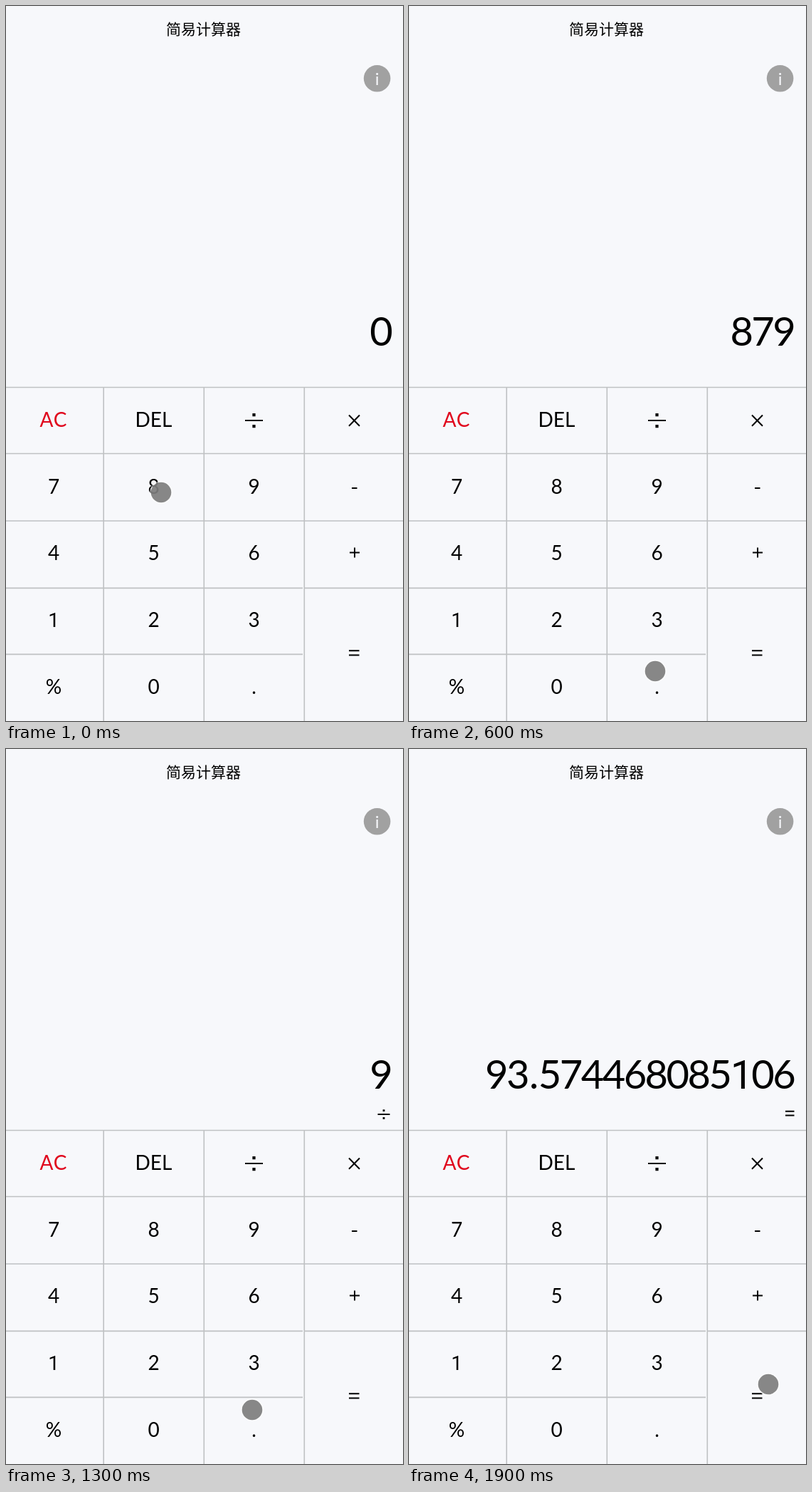
Write an HTML page that moves like this. It is 558x1004 px and loops after 2 s.

```html
<!DOCTYPE html>
<html lang="zh-CN">
<head>
<meta charset="utf-8">
<title>简易计算器</title>
<style>
  html, body { margin: 0; width: 100%; height: 100%; overflow: hidden; background: #f7f8fb; }
  svg { display: block; width: 100%; height: 100%; }
  text { font: 28px Lato, sans-serif; text-anchor: middle; }
  .one { font-family: Roboto, sans-serif; }
  .title { font: 21px "Noto Sans CJK SC", "Noto Sans CJK", sans-serif; }
  .info { font-size: 24px; fill: #f7f8fb; }
  #value, #value .one { font-size: 56px; }
  .grid { stroke: #bfc1c3; stroke-width: 1.6; fill: none; }
  .sign { stroke: #000; stroke-width: 2; fill: none; }
</style>
</head>
<body>
<svg viewBox="0 0 558 1004">
  <text class="title" x="277.5" y="40">简易计算器</text>
  <circle cx="521.6" cy="101.8" r="18.8" fill="#a1a1a1"/>
  <text class="info" x="521.6" y="111">i</text>

  <path class="grid" d="M0 535.5H558M0 628.5H558M0 723H558M0 817.4H417M419 817.4H558M0 910.4H417
    M137.2 535V1004M278.3 535V1004M419.3 535V1004"/>

  <g id="keys"></g>
  <path class="sign" stroke-width="2.4" d="M336 582H361"/>
  <path d="M346.4 572h4.2v4.2h-4.2zM346.4 588h4.2v4.2h-4.2z"/>
  <path class="sign" d="M482 574.5L497 589.7M497 574.5L482 589.7
    M486 677H493.5M483 767.5H497M490 760.5V774.5M482 905.2H496.5M482 911.4H496.5"/>

  <text id="value" y="476.5"></text>
  <g id="divide">
    <path class="sign" d="M522.5 513H539.5"/>
    <path d="M529.6 506.2h2.8v2.8h-2.8zM529.6 517h2.8v2.8h-2.8z"/>
  </g>
  <path id="equals" class="sign" d="M529 508.8H541.5M529 514.4H541.5"/>

  <g id="touch">
    <circle r="16" fill="#fff" opacity=".5"/>
    <circle r="14.3" fill="#707070" opacity=".84"/>
  </g>
</svg>
<script>
const byId = id => document.getElementById(id);
const glyph = (c, x) => `<tspan x="${x}"${c === '1' ? ' class="one"' : ''}>${c}</tspan>`;

const cols = [67, 207.5, 348.5];
const rows = [[591, ['AC', 'DEL']], [685, '789'], [778, '456'], [872, '123'], [966, '%0.']];
byId('keys').innerHTML = rows.map(([y, labels]) => [...labels].map((label, i) =>
  `<text y="${y}"${label === 'AC' ? ' fill="#e0061c" letter-spacing="1"' : ''}>${glyph(label, cols[i])}</text>`
).join('')).join('');

// Right-aligned digits with a narrow decimal point
function layout(value) {
  let right = 542.5, out = '';
  for (const c of [...value].reverse()) {
    const w = c === '.' ? 15 : 29.95;
    out = glyph(c, right - w / 2) + out;
    right -= w;
  }
  return out;
}

// start in ms, touch x, touch y, value, pending operator
const steps = [
  [0, 218, 683, '0', ''],
  [100, 218, 683, '8', ''],
  [200, 55, 681, '87', ''],
  [300, 335, 672, '87', ''],
  [400, 335, 672, '879', ''],
  [500, 346, 934, '879', ''],
  [700, 346, 934, '879.', ''],
  [800, 348, 781, '879.', ''],
  [900, 348, 781, '879.6', ''],
  [1000, 368, 587, '879.6', ''],
  [1100, 368, 587, '879.6', '÷'],
  [1200, 350, 678, '9', '÷'],
  [1300, 346, 928, '9', '÷'],
  [1400, 346, 928, '9.', '÷'],
  [1500, 82, 781, '9.', '÷'],
  [1700, 82, 781, '9.4', '÷'],
  [1800, 505, 892, '93.574468085106', '=']
];
const LOOP = 2000;
let shown;

function show(step) {
  if (step === shown) return;
  shown = step;
  const [, x, y, value, op] = step;
  byId('value').innerHTML = layout(value);
  byId('divide').style.display = op === '÷' ? '' : 'none';
  byId('equals').style.display = op === '=' ? '' : 'none';
  byId('touch').setAttribute('transform', `translate(${x} ${y})`);
}

const start = performance.now();
function tick() {
  const t = (performance.now() - start) % LOOP;
  show(steps.findLast(step => step[0] <= t));
  requestAnimationFrame(tick);
}
tick();
</script>
</body>
</html>
```
